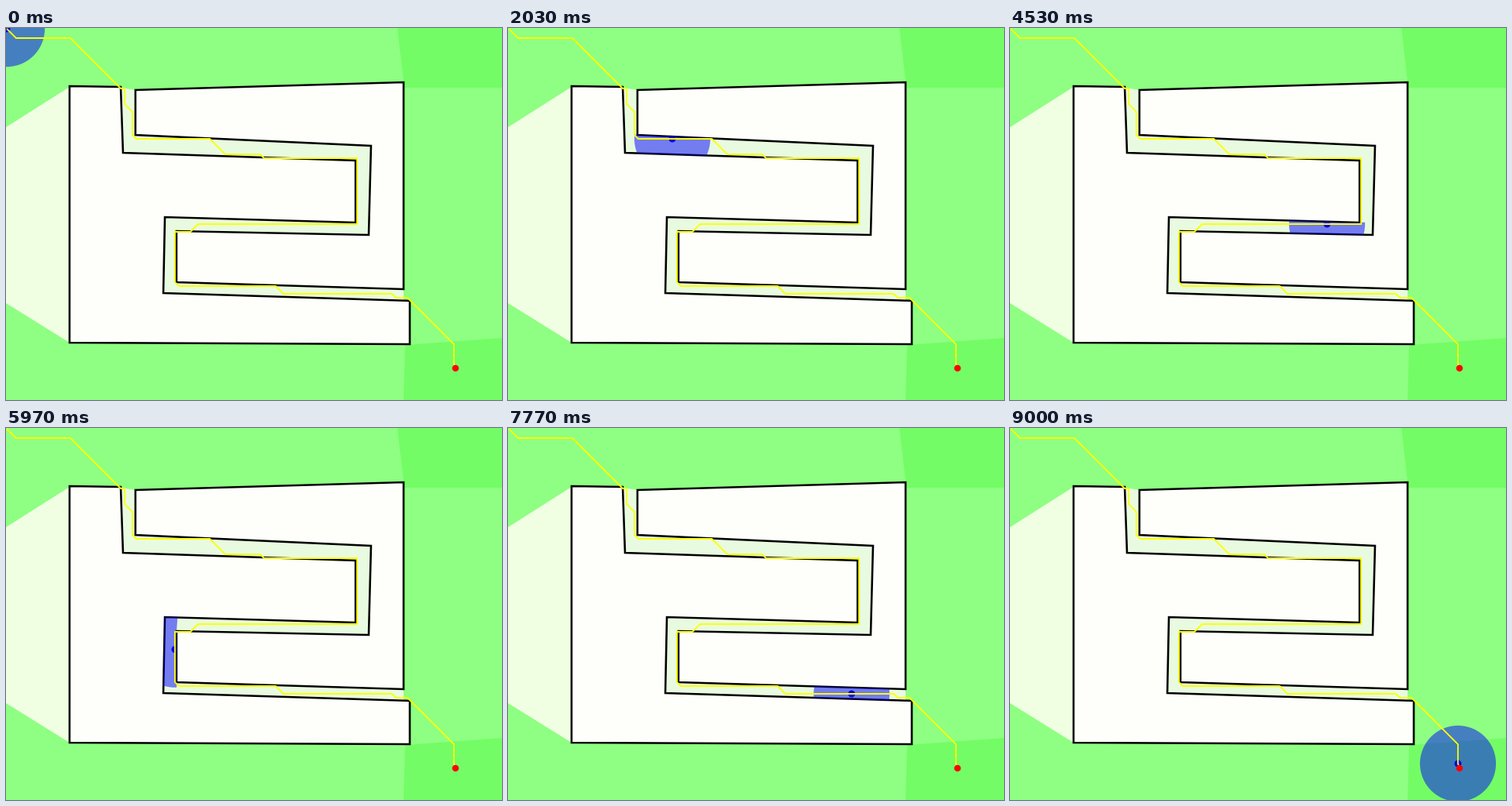
Recreate the animation shown at these times as an HTML page with a canvas. Size 640 by 480 pixels, loop 9030 ms.

```html
<!DOCTYPE html>
<html lang="en">
<head>
<meta charset="utf-8">
<title>Robot path through a corridor</title>
<style>
html, body { margin: 0; width: 100%; height: 100%; overflow: hidden; background: #fff; }
canvas { display: block; }
</style>
</head>
<body>
<canvas id="stage" width="640" height="480"></canvas>
<script>
const W = 640, H = 480, LOOP = 9030, FPS = 30, LAST = 270;
const RANGE = 49, SPEED = 5.07, DELAY = 2, RAYS = 1080;
const ctx = document.getElementById('stage').getContext('2d');

const blocks = [
  [[82, 75], [148, 76], [151, 161], [451, 171], [451, 251], [205, 244],
   [203, 342], [521, 352], [521, 408], [82, 406]],
  [[167, 80], [513, 70], [513, 337], [220, 328], [220, 262], [468, 267],
   [471, 152], [167, 138]]
];
const stops = [
  [1, 1], [83, 13], [153, 78], [153, 98], [163, 138], [263, 143], [328, 163],
  [453, 168], [453, 253], [248, 253], [218, 263], [218, 328], [348, 333],
  [498, 343], [518, 348], [578, 433]
];
const goal = [580, 439];

// Each leg runs diagonally first, then straight.
const route = [stops[0]];
for (const [x, y] of stops.slice(1)) {
  const [px, py] = route[route.length - 1];
  const diag = Math.min(Math.abs(x - px), Math.abs(y - py));
  if (diag) route.push([px + Math.sign(x - px) * diag, py + Math.sign(y - py) * diag]);
  route.push([x, y]);
}

function trace(path, pts, closed) {
  pts.forEach(([x, y], i) => i ? path.lineTo(x, y) : path.moveTo(x, y));
  if (closed) path.closePath();
  return path;
}
const shape = pts => trace(new Path2D(), pts, true);
const routeLine = trace(new Path2D(), [...route, goal], false);
const walls = new Path2D();
blocks.forEach(b => trace(walls, b, true));
const freeSpace = new Path2D(walls);
freeSpace.rect(0, 0, W, H);
const edges = blocks.flatMap(b => b.map((p, i) => [p, b[(i + 1) % b.length]]));

// Regions of open ground, tinted by how much of the outside they see.
const regions = [
  ['#8eff82', [[0, 0], [W, 0], [W, H], [0, H]]],
  ['#74fc66', [[505, 0], [W, 0], [W, 77], [514, 77]]],
  ['#74fc66', [[515, 409], [W, 400], [W, H], [513, H]]],
  ['#f0ffe2', [[0, 128], [82, 76], [82, 406], [0, 355]]],
  ['#e8fbe0', [[148, 77], [167, 80], [513, 80], [513, 352], [148, 352]]]
].map(([color, pts]) => [color, shape(pts)]);

function drawMap() {
  for (const [color, area] of regions) {
    ctx.fillStyle = color;
    ctx.fill(area);
  }
  ctx.fillStyle = '#fefefa';
  ctx.fill(walls);
  ctx.strokeStyle = '#000';
  ctx.lineWidth = 2.6;
  ctx.stroke(walls);
}

function pointAt(dist) {
  for (let i = 1; i < route.length; i++) {
    const [ax, ay] = route[i - 1], [bx, by] = route[i];
    const len = Math.hypot(bx - ax, by - ay);
    if (dist <= len) return [ax + (bx - ax) * dist / len, ay + (by - ay) * dist / len];
    dist -= len;
  }
  return route[route.length - 1];
}

// Nudge the robot off a wall it touches.
function clearOfWalls([x, y]) {
  ctx.lineWidth = 3;
  const blocked = (px, py) =>
    ctx.isPointInPath(walls, px, py) || ctx.isPointInStroke(walls, px, py);
  if (!blocked(x, y)) return [x, y];
  for (const [dx, dy] of [[0, -2], [0, 2], [-2, 0], [2, 0]]) {
    if (!blocked(x + dx, y + dy)) return [x + dx, y + dy];
  }
  return [x, y];
}

function castRay(x, y, angle) {
  const dx = Math.cos(angle), dy = Math.sin(angle);
  let reach = RANGE;
  for (const [[ax, ay], [bx, by]] of edges) {
    const ex = bx - ax, ey = by - ay, det = dx * ey - dy * ex;
    if (Math.abs(det) < 1e-9) continue;
    const t = ((ax - x) * ey - (ay - y) * ex) / det;
    const u = ((ax - x) * dy - (ay - y) * dx) / det;
    if (t >= 0 && t < reach && u >= 0 && u <= 1) reach = t;
  }
  return [x + dx * reach, y + dy * reach];
}

function disc(x, y, r, color) {
  ctx.fillStyle = color;
  ctx.beginPath();
  ctx.arc(x, y, r, 0, Math.PI * 2);
  ctx.fill();
}

function draw(time) {
  const frame = Math.min(LAST, Math.floor((time % LOOP + 4) * FPS / 1000));
  const [x, y] = clearOfWalls(pointAt(Math.max(0, frame - DELAY) * SPEED));
  drawMap();

  const view = Array.from({ length: RAYS }, (_, i) => castRay(x, y, i / RAYS * Math.PI * 2));
  ctx.fillStyle = 'rgba(0, 0, 255, 0.5)';
  ctx.fill(shape(view));

  ctx.save();
  ctx.clip(freeSpace, 'evenodd');
  disc(x, y, 4.5, '#0000e6');
  ctx.restore();

  ctx.strokeStyle = '#ff0';
  ctx.lineWidth = 1.8;
  ctx.stroke(routeLine);
  disc(...goal, 4.3, '#f00');
}

const start = performance.now();
function tick() {
  draw(performance.now() - start);
  requestAnimationFrame(tick);
}
tick();
</script>
</body>
</html>
```
